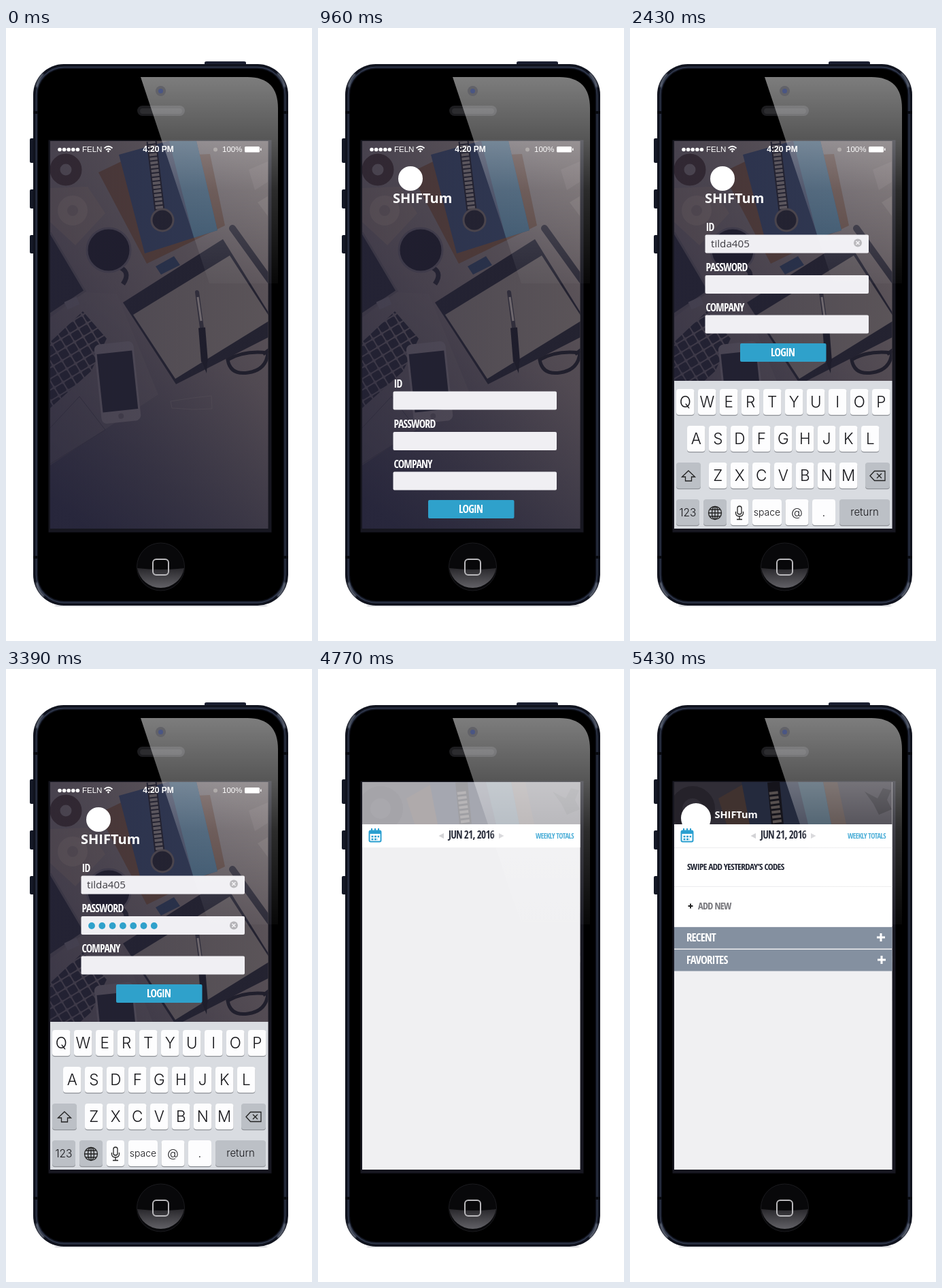
Recreate the animation shown at these times as an HTML page. Size 450 by 900 pixels, loop 6.49 s.

```html
<!DOCTYPE html>
<html lang="en">
<head>
<meta charset="utf-8">
<title>Login walkthrough</title>
<style>
  html, body { margin: 0; width: 100%; height: 100%; overflow: hidden; background: #fff; }
  svg { display: block; width: 100%; height: 100%; }
  text { white-space: pre; }
  .n { font: 700 calc(var(--s) * var(--k, 1) * 1px) var(--face, "Open Sans"), sans-serif; font-stretch: 62.5%; font-variation-settings: "wdth" 62.5; letter-spacing: -.05em; }
  .thin { font-weight: 400; }
  .brand { font: 700 20px "Open Sans", sans-serif; fill: #fff; }
  .status { font: 11.5px "Liberation Sans", sans-serif; fill: #fff; }
  .entry { font: 15.2px "Open Sans", sans-serif; fill: #3d3c42; }
  .key { font: 300 22.5px Inter, "Liberation Sans", sans-serif; fill: #16161a; text-anchor: middle; }
  .line { fill: none; stroke: #222; stroke-width: 1.3; }
  .mid { text-anchor: middle; }
  .end { text-anchor: end; }
</style>
</head>
<body>
<svg viewBox="0 0 450 900">
  <defs>
    <clipPath id="screenClip"><rect x="65" y="166" width="320.5" height="569"/></clipPath>
    <clipPath id="headerClip"><rect x="65" y="166" width="320.5" height="62"/></clipPath>
    <linearGradient id="desk" gradientUnits="userSpaceOnUse" x1="390" y1="230" x2="60" y2="690">
      <stop stop-color="#746a67"/><stop offset=".45" stop-color="#5d5458"/>
      <stop offset=".78" stop-color="#3f3b47"/><stop offset="1" stop-color="#2c2b3d"/>
    </linearGradient>
    <linearGradient id="tint">
      <stop stop-color="#22213a" stop-opacity=".45"/><stop offset="1" stop-color="#22213a" stop-opacity=".2"/>
    </linearGradient>
    <linearGradient id="gloss" gradientUnits="userSpaceOnUse" x1="0" y1="72" x2="0" y2="375">
      <stop stop-color="#fff" stop-opacity=".49"/><stop offset=".3" stop-color="#fff" stop-opacity=".34"/>
      <stop offset=".55" stop-color="#fff" stop-opacity=".17"/><stop offset="1" stop-color="#fff" stop-opacity=".03"/>
    </linearGradient>
    <linearGradient id="shine" x2="0" y2="1"><stop stop-color="#29282c"/><stop offset="1" stop-color="#626166"/></linearGradient>
    <pattern id="laptopKeys" width="15" height="14" patternUnits="userSpaceOnUse" patternTransform="rotate(-31)">
      <rect width="13" height="12" rx="2" fill="#23222d"/>
    </pattern>
    <filter id="soft"><feGaussianBlur stdDeviation="1"/></filter>
  </defs>

  <!-- phone body -->
  <path d="M72 848Q227 851 384 848" stroke="#c6c8ce" stroke-width="2" fill="none" filter="url(#soft)"/>
  <path d="M292 55V51q0-2 3-2H350q3 0 3 2V55Z" fill="#1c2032"/>
  <g fill="#141826">
    <rect x="35" y="162" width="8" height="36" rx="2"/>
    <rect x="35" y="237" width="8" height="28" rx="2"/>
    <rect x="35" y="304" width="8" height="27" rx="2"/>
  </g>
  <rect x="40" y="53" width="375" height="795" rx="45" fill="#10131e"/>
  <rect x="44.5" y="57.5" width="366" height="786" rx="41" fill="none" stroke="#2d3548" stroke-width="1.8"/>
  <path d="M45 86Q47 76 54 68M410 86Q408 76 400 67M45 815Q47 826 55 834M410 815Q408 826 400 834"
    fill="none" stroke="#8b94a5" stroke-width="1.8" stroke-linecap="round" filter="url(#soft)"/>
  <path d="M40 124h7M408 124h7M40 777h7M408 777h7" stroke="#080a10" stroke-width="4"/>
  <rect x="47" y="60" width="361" height="781" rx="38"/>
  <rect x="62.5" y="164.5" width="328" height="576" fill="#171720"/>

  <g clip-path="url(#screenClip)">
    <!-- desk scene -->
    <rect x="65" y="166" width="321" height="570" fill="url(#desk)"/>
    <path d="M65 235L120 233 146 272 102 319 65 285Z" fill="#75665f" opacity=".6"/>
    <circle cx="88" cy="208" r="16" fill="none" stroke="#3c2d2d" stroke-width="15"/>
    <circle cx="98" cy="268" r="15" fill="none" stroke="#877870" stroke-width="14" opacity=".5"/>
    <path d="M136 212L182 190 300 185 322 290 207 346Z" fill="#604538"/>
    <path d="M166 186L238 166H280L311 297 204 331Z" fill="#343f59"/>
    <path d="M240 166H280L311 297 276 308Z" fill="#365c75"/>
    <path d="M214 166L226 268" stroke="#24232c" stroke-width="15"/>
    <path d="M214 166L226 268" stroke="#77706f" stroke-width="11" stroke-dasharray="4 2"/>
    <circle cx="230" cy="282" r="16" fill="#24232d" stroke="#5d5555" stroke-width="3"/>
    <path d="M220 350L247 335 256 348 228 362Z" fill="#2c3850"/>
    <path d="M164 350Q185 357 172 376" fill="none" stroke="#25232d" stroke-width="7"/>
    <circle cx="151" cy="326" r="32" fill="#1e1c27" stroke="#514b54" stroke-width="3"/>
    <path d="M172 403L319 310 400 440V447L250 523Z" fill="#24232e"/>
    <path d="M187 421L329 334 390 428 249 515Z" fill="#696160"/>
    <path d="M281 388L288 440" stroke="#36333c" stroke-width="6" stroke-linecap="round"/>
    <path d="M282 395L287 430" stroke="#8b8280" stroke-width="3"/>
    <path d="M288 440L292 490" stroke="#1d1c26" stroke-width="10"/>
    <path d="M288 489L296 489 295 507Z" fill="#1d1c26"/>
    <path d="M333 294L390 373" stroke="#292731" stroke-width="10" stroke-linecap="round"/>
    <g fill="none" stroke="#201f29" stroke-width="5">
      <path d="M326 487Q350 473 385 477Q383 502 356 506Q330 510 326 487Z"/><path d="M378 479L390 470"/>
    </g>
    <path d="M357 208L385 196V226L366 238Z" fill="#948a86" opacity=".35"/>
    <path d="M370 256L385 247V276Z" fill="#968c87" opacity=".4"/>
    <path d="M65 425L116 388 163 390 224 538 65 642Z" fill="#61595d" opacity=".35"/>
    <path d="M65 300L116 386 65 420Z" fill="#25242f"/>
    <path d="M65 300L116 386 65 420" fill="none" stroke="#4f494f" stroke-width="3"/>
    <path d="M88 408L106 400" stroke="#5c565e" stroke-width="12"/>
    <path d="M65 461L113 416 148 456 125 504 65 558Z" fill="url(#laptopKeys)"/>
    <path d="M65 587L108 541 146 590 65 640" fill="none" stroke="#39353f"/>
    <g transform="rotate(-6 164 520)">
      <rect x="135" y="462" width="58" height="117" rx="8" fill="#625b62"/>
      <rect x="138" y="476" width="52" height="86" fill="#22212c"/>
      <circle cx="164" cy="570" r="4" fill="#504a51"/>
    </g>
    <path d="M242 548L275 543 302 540 303 559 275 560 244 558Z" fill="none" stroke="#6b6365" opacity=".5"/>
    <rect x="65" y="166" width="321" height="570" fill="url(#tint)"/>

    <!-- status bar -->
    <g fill="#fff">
      <g id="signal"></g>
      <path d="M144.5 176.5Q150.5 171 156.5 176.5M147 179Q150.5 176 154 179" fill="none" stroke="#fff" stroke-width="1.7"/>
      <circle cx="150.5" cy="181" r="1.4"/>
      <circle cx="308" cy="178.5" r="3" fill="#8d8685"/>
      <rect x="351" y="174" width="22" height="8.5" rx="1.5"/><rect x="374" y="176.5" width="1.5" height="3.5"/>
    </g>
    <text class="status" x="112" y="182">FELN</text>
    <text class="status mid" x="224" y="182" style="font-weight:700;font-size:12px">4:20 PM</text>
    <text class="status" x="318" y="182">100%</text>

    <!-- login -->
    <g id="logo">
      <circle cx="136" cy="221" r="18" fill="#fff"/>
      <text class="brand" x="110" y="257">SHIFTum</text>
    </g>
    <g id="form">
      <g class="n" style="--s:17" fill="#fff">
        <text x="111.5" y="297.5">ID</text>
        <text x="111.5" y="356.5" id="gauge">PASSWORD</text>
        <text x="111.5" y="415.5">COMPANY</text>
      </g>
      <g fill="#f0eff3">
        <rect x="110.5" y="303.5" width="240.5" height="27" rx="2"/>
        <rect x="110.5" y="363" width="240.5" height="27" rx="2"/>
        <rect x="110.5" y="421.5" width="240.5" height="27" rx="2"/>
      </g>
      <rect id="login" x="162" y="463" width="126.5" height="27" rx="2"/>
      <text class="n mid" style="--s:17" x="224.5" y="482" fill="#fff">LOGIN</text>
      <text class="entry" id="user" x="119" y="322"></text>
      <g id="dots" fill="#2fa1cb"></g>
      <text class="entry" id="firm" x="119" y="440"></text>
      <g id="clears"></g>
    </g>
    <g id="keyboard">
      <rect x="65" y="518" width="321" height="218" fill="#d9dce1"/>
      <g id="keys"></g>
      <path class="line" d="M86 650L95.5 659H90.5V665H81.5V659H76.5Z"/>
      <path class="line" d="M353 657.5L359.5 650.5H375V664.5H359.5ZM363 654L370 661M370 654L363 661"/>
      <g class="line">
        <circle cx="125" cy="712" r="9.5"/><ellipse cx="125" cy="712" rx="4.5" ry="9.5"/>
        <path d="M125 702.5V721.5M115.5 712H134.5M117.5 707H132.5M117.5 717H132.5"/>
        <rect x="158" y="702" width="6" height="12" rx="3"/>
        <path d="M155.5 710V712Q155.5 717 161 717T166.5 712V710M161 717V721.5M157 721.5H165"/>
      </g>
    </g>

    <!-- timesheet -->
    <rect id="page" x="65" y="166" width="321" height="570" fill="#f0f0f2"/>
    <g id="header" clip-path="url(#headerClip)">
      <rect x="65" y="166" width="321" height="62" fill="#302d36"/>
      <circle cx="92" cy="205" r="24" fill="none" stroke="#25222a" stroke-width="18"/>
      <path d="M130 190L172 166H305L318 228H142Z" fill="#40322f"/>
      <path d="M164 166H284L296 228H176Z" fill="#242a3d"/>
      <path d="M247 166H284L296 228H262Z" fill="#2c4253"/>
      <path d="M211 166L217 228" stroke="#15141b" stroke-width="18"/>
      <path d="M211 180L217 228" stroke="#57504f" stroke-width="13" stroke-dasharray="4 3"/>
      <path d="M345 180L364 190 372 175 384 178 378 192 385 206 366 214 358 198Z" fill="#1b1920"/>
    </g>
    <g id="headerLogo" clip-path="url(#headerClip)">
      <circle cx="97" cy="219" r="22" fill="#fff"/>
      <text class="brand" style="font-size:14.5px" x="124.5" y="219">SHIFTum</text>
    </g>
    <g id="dateRow">
      <rect x="65" y="228" width="321" height="34" fill="#fff"/>
      <rect x="75.5" y="237.5" width="17" height="16" rx="2" fill="none" stroke="#2a9fd0" stroke-width="2"/>
      <path d="M75 240H93" stroke="#2a9fd0" stroke-width="4"/>
      <path d="M79 234V239M84 234V239M89 234V239" stroke="#2a9fd0" stroke-width="2"/>
      <path d="M78.5 246H90M78.5 250H88" stroke="#2a9fd0" stroke-width="2.5" stroke-dasharray="3 1.5"/>
      <path d="M185 241V249L177.5 245ZM266 241V249L273.5 245Z" fill="#d3d3d6"/>
      <text class="n mid" style="--s:16.5" x="225.5" y="249" fill="#2a2e3c">JUN 21, 2016</text>
      <text class="n thin end" style="--s:11.3" x="376" y="248.5" fill="#2a9fd0">WEEKLY TOTALS</text>
    </g>
    <g class="row">
      <rect x="65" y="262" width="321" height="57" fill="#fff"/><path d="M65 262.5H386" stroke="#ececee"/>
      <text class="n" style="--s:14.3" x="84" y="295" fill="#1f2331">SWIPE ADD YESTERDAY’S CODES</text>
    </g>
    <g class="row">
      <rect x="65" y="319" width="321" height="59" fill="#fff"/><path d="M65 319.5H386" stroke="#ececee"/>
      <path d="M85.5 348H92.5M89 344.5V351.5" stroke="#222" stroke-width="2"/>
      <text class="n thin" style="--s:15.5" x="100" y="353" fill="#77777c">ADD NEW</text>
    </g>
    <g class="row">
      <rect x="65" y="379" width="321" height="31.5" fill="#8490a0"/>
      <text class="n" style="--s:18" x="83" y="400" fill="#fff">RECENT</text>
      <path d="M363 394H375M369 388V400" stroke="#fff" stroke-width="3"/>
    </g>
    <g class="row">
      <rect x="65" y="412" width="321" height="31.5" fill="#8490a0"/>
      <text class="n" style="--s:18" x="83" y="433" fill="#fff">FAVORITES</text>
      <path d="M364 427H376M370 421V433" stroke="#fff" stroke-width="3"/>
    </g>
  </g>

  <!-- camera, speaker, glass, home button -->
  <rect x="193" y="114" width="70" height="15" rx="7.5" fill="#1d1d20"/>
  <rect x="197" y="118" width="62" height="8" rx="4" fill="#2c2c2f"/>
  <path d="M198 72H355Q400 72 400 118V375H299Z" fill="url(#gloss)"/>
  <circle cx="227.5" cy="92.500" r="7.5" fill="#626268"/>
  <circle cx="227.5" cy="92.500" r="3.5" fill="#4a5683"/>
  <circle cx="227.5" cy="791" r="35" fill="#08080a" stroke="#1b1b1f"/>
  <path d="M193 793Q227 797 262 793A35 35 0 0 1 193 793Z" fill="url(#shine)"/>
  <rect x="216" y="780" width="23" height="23" rx="5" fill="none" stroke="#b9b8bb" stroke-width="2"/>
</svg>
<script>
const LOOP = 6490, STEP = 30;
const $ = id => document.getElementById(id);
const add = (id, markup) => $(id).insertAdjacentHTML('beforeend', markup);
const repeat = (n, make) => Array.from({ length: n }, (_, i) => make(i)).join('');

// Use the narrowest face at hand, sized by one common factor.
function chooseNarrowFace() {
  const root = document.documentElement.style;
  const width = face => {
    root.setProperty('--face', `"${face}"`);
    return $('gauge').getComputedTextLength();
  };
  const faces = ['Open Sans', 'Noto Sans', 'Roboto', 'Open Sans Condensed', 'Roboto Condensed', 'Liberation Sans Narrow'];
  const best = faces.sort((a, b) => width(a) - width(b))[0];
  root.setProperty('--k', Math.min(1, 61 / width(best)));
}

function key(x, y, w, label = '', dark = false, size = 22.5) {
  add('keys', `<rect x="${x}" y="${y + 1.2}" width="${w}" height="38" rx="4" fill="#8f9298"/>
    <rect x="${x}" y="${y}" width="${w}" height="38" rx="4" fill="${dark ? '#bcc0c6' : '#fdfdfe'}"/>
    <text class="key" style="font-size:${size}px" x="${x + w / 2}" y="${y + 19 + size * .36}">${label}</text>`);
}

function buildKeyboard() {
  [['QWERTYUIOP', 68], ['ASDFGHJKL', 84], ['ZXCVBNM', 116]].forEach(([letters, left], row) =>
    [...letters].forEach((c, i) => key(left + 32 * i, 530 + 54 * row, 26.5, c)));
  key(68, 638, 36, '', true);
  key(346, 638, 36, '', true);
  key(68, 692, 34, '123', true, 15.5);
  key(108, 692, 34, '', true);
  key(148, 692, 26);
  key(180, 692, 43, 'space', false, 14);
  key(228.5, 692, 34, '@', false, 17);
  key(268, 692, 34, '.', false, 17);
  key(308, 692, 74, 'return', true, 15);
}

chooseNarrowFace();
buildKeyboard();
add('signal', repeat(5, i => `<circle cx="${79 + 6.6 * i}" cy="178.5" r="2.8"/>`));
add('dots', repeat(7, i => `<circle cx="${126 + 15.3 * i}" cy="377" r="4.9"/>`));
add('clears', [315.5, 376.5, 434.5].map(y =>
  `<g><circle cx="335" cy="${y}" r="6" fill="#b4b3b7"/>
   <path d="M332.5 ${y - 2.5}l5 5m0-5l-5 5" stroke="#f4f3f6" stroke-width="1.6"/></g>`).join(''));
for (const [id, word] of [['user', 'tilda405'], ['firm', 'ZELM']])
  add(id, [...word].map(c => `<tspan>${c}</tspan>`).join(''));

const rows = [...document.querySelectorAll('.row')];
const dotTimes = [2790, 2880, 2970, 3060, 3150, 3300, 3390];
const clearTimes = [1920, 2700, 3630];

const clamp = v => Math.min(1, Math.max(0, v));
const smooth = p => p * p * (3 - 2 * p);
const fade = (node, p) => node.setAttribute('opacity', p);
const shift = (node, y) => node.setAttribute('transform', `translate(0 ${y})`);

function draw(t) {
  const span = (from, to) => clamp((t - from) / (to - from));
  const type = (id, from, to) => {
    const chars = [...$(id).children];
    chars.forEach((c, i) => c.setAttribute('fill-opacity', clamp(span(from, to) * chars.length - i)));
  };

  shift($('logo'), 545 - 330 * smooth(span(30, 390)) - 215 * smooth(span(540, 940)));
  shift($('form'), 460 * (1 - smooth(span(720, 1200))));
  shift($('keyboard'), 217 * (1 - span(1440, 1590) + span(4110, 4260)));

  type('user', 1890, 2430);
  type('firm', 3600, 3930);
  [...$('dots').children].forEach((dot, i) => fade(dot, +(t >= dotTimes[i])));
  [...$('clears').children].forEach((icon, i) => fade(icon, +(t >= clearTimes[i])));
  $('login').setAttribute('fill', t >= 4110 ? '#2b7d9c' : '#2fa1cb');

  fade($('page'), span(4290, 4650));
  fade($('dateRow'), span(4530, 4770));
  fade($('header'), span(4650, 4980));
  fade($('headerLogo'), span(4920, 5190));
  rows.forEach((row, i) => {
    const p = span(4830 + 110 * i, 5070 + 110 * i);
    fade(row, p);
    shift(row, 24 * (1 - smooth(p)));
  });
}

function tick(now) {
  draw(Math.floor((now % LOOP) / STEP) * STEP);
  requestAnimationFrame(tick);
}
draw(0);
requestAnimationFrame(tick);
</script>
</body>
</html>
```
